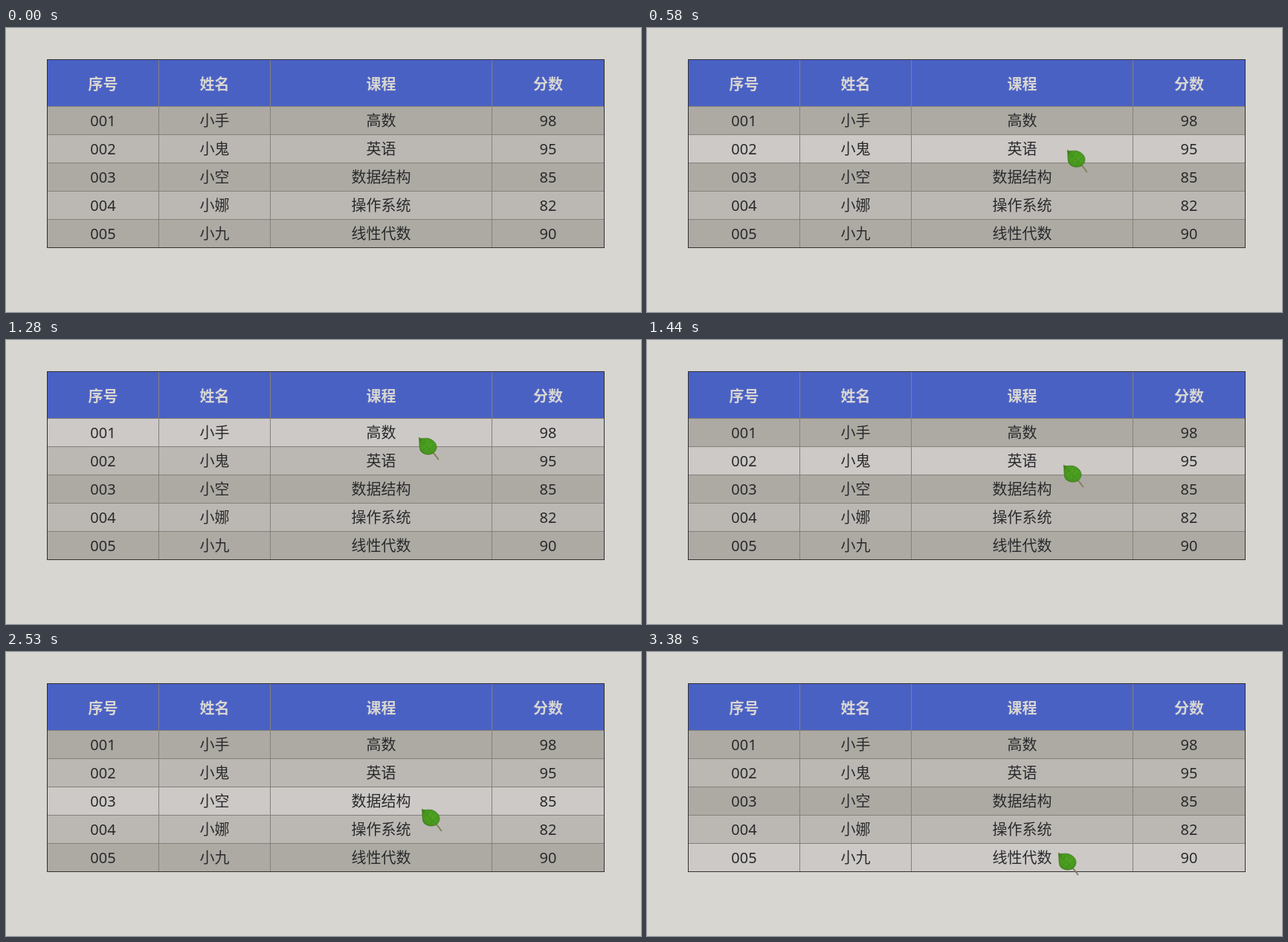
Write an HTML page that moves like this. It is 854 px wide and 382 px high and loops after 4.93 s.

```html
<!DOCTYPE html>
<html lang="zh-CN">
<head>
<meta charset="utf-8">
<title>成绩表</title>
<style>
  html, body { margin: 0; width: 100%; height: 100%; overflow: hidden; background: #d8d6d1; }
  svg { display: block; }
  text {
    font: 350 20px "Noto Sans CJK SC", "Noto Sans CJK", sans-serif;
    text-anchor: middle;
    fill: #292a2d;
  }
  .number { font: 20px "Noto Sans", sans-serif; }
  .head { font-weight: 700; fill: #d8d6d1; }
</style>
</head>
<body>
<svg width="854" height="382" viewBox="0 0 854 382">
  <defs>
    <radialGradient id="green" cx=".55" cy=".45" r=".65">
      <stop offset="0" stop-color="#4fa522"/>
      <stop offset=".7" stop-color="#48981f"/>
      <stop offset="1" stop-color="#3a761b"/>
    </radialGradient>
  </defs>
  <g id="table"></g>
  <g id="leaf" fill="none" stroke-linecap="round">
    <path d="M18 19Q22 23 26.5 29.5" stroke="#85805f" stroke-width="1.9"/>
    <path d="M.5 .7C4 2.5 7 .6 12 1.3C18 2.2 24 7 24 13C24 17 21 21 18 22C13 24 7 23 3.5 19.5C0 15.5 1.5 8 .5 .7Z"
          fill="url(#green)" stroke="#437a20" stroke-width=".8"/>
    <path d="M2 3Q9 10 18 19.5M8 9L9 4M12 13L15 6M15 16L20 11M7 8L3.5 11M11 12L6 17M14 15L12 20"
          stroke="#377b17" stroke-width=".7" opacity=".65"/>
  </g>
</svg>
<script>
const LOOP = 4930, TICK = 80;
const LEFT = 55, WIDTH = 750, TOP = 106, ROW = 38;
const LINE = "#83817b";

const columns = [
  { title: "序号", left: 55, right: 205, cells: ["001", "002", "003", "004", "005"] },
  { title: "姓名", left: 205, right: 355, cells: ["小手", "小鬼", "小空", "小娜", "小九"] },
  { title: "课程", left: 355, right: 653, cells: ["高数", "英语", "数据结构", "操作系统", "线性代数"] },
  { title: "分数", left: 653, right: 804, cells: ["98", "95", "85", "82", "90"] }
];

// The pointer rests after each stroke until the next begins.
const strokes = [
  { start: 280, end: 750, from: [637, 345], to: [556, 141] },
  { start: 1280, end: 1440, from: [555, 131], to: [560, 168] },
  { start: 1900, end: 1990, from: [561, 183], to: [561, 190] },
  { start: 2450, end: 2770, from: [561, 193], to: [557, 233] },
  { start: 3230, end: 3380, from: [556, 243], to: [553, 270] }
];

const table = document.getElementById("table");
const leaf = document.getElementById("leaf");

function add(tag, attrs, content) {
  const el = document.createElementNS("http://www.w3.org/2000/svg", tag);
  for (const key in attrs) el.setAttribute(key, attrs[key]);
  if (content) el.textContent = content;
  return table.appendChild(el);
}
const box = (x, y, width, height, fill) => add("rect", { x, y, width, height, fill });
const rowColor = i => i % 2 ? "#bbb8b3" : "#adaaa3";

box(LEFT, 42, WIDTH, 64, "#4a61c4");
const bands = columns[0].cells.map((_, i) => box(LEFT, TOP + i * ROW, WIDTH, ROW, rowColor(i)));
bands.forEach((_, i) => box(LEFT, TOP - 1 + i * ROW, WIDTH, 1, LINE));

for (const { title, left, right, cells } of columns) {
  box(left, 43, 1, 252, LINE);
  const x = (left + right + 1) / 2;
  add("text", { x, y: 83, class: "head" }, title);
  cells.forEach((cell, i) =>
    add("text", { x, y: 132 + i * ROW, class: /\d/.test(cell) ? "number" : "word" }, cell));
}
add("rect", { x: LEFT + .5, y: 42.5, width: WIDTH - 1, height: 253, fill: "none", stroke: "#303133" });

function pointerAt(time) {
  const stroke = strokes.filter(s => s.start <= time).pop();
  if (!stroke) return null;
  const { start, end, from, to } = stroke;
  const moves = Math.round((end - start) / TICK);
  const progress = Math.min(1, (time - start) / (end - start));
  // Pointer samples arrive slightly unevenly, so allow an early tick.
  const p = Math.floor(progress * moves + .2) / moves;
  const eased = 1 - (1 - p) ** 2;
  return from.map((v, i) => Math.round(v + (to[i] - v) * eased));
}

function draw(time) {
  const point = pointerAt(time);
  leaf.style.display = point ? "" : "none";
  if (point) leaf.setAttribute("transform", `translate(${point})`);
  const hovered = point ? Math.floor((point[1] - TOP) / ROW) : -1;
  bands.forEach((band, i) => band.setAttribute("fill", i === hovered ? "#cdc9c6" : rowColor(i)));
}

const origin = performance.now();
function tick() {
  draw((performance.now() - origin) % LOOP);
  requestAnimationFrame(tick);
}
tick();
</script>
</body>
</html>
```
